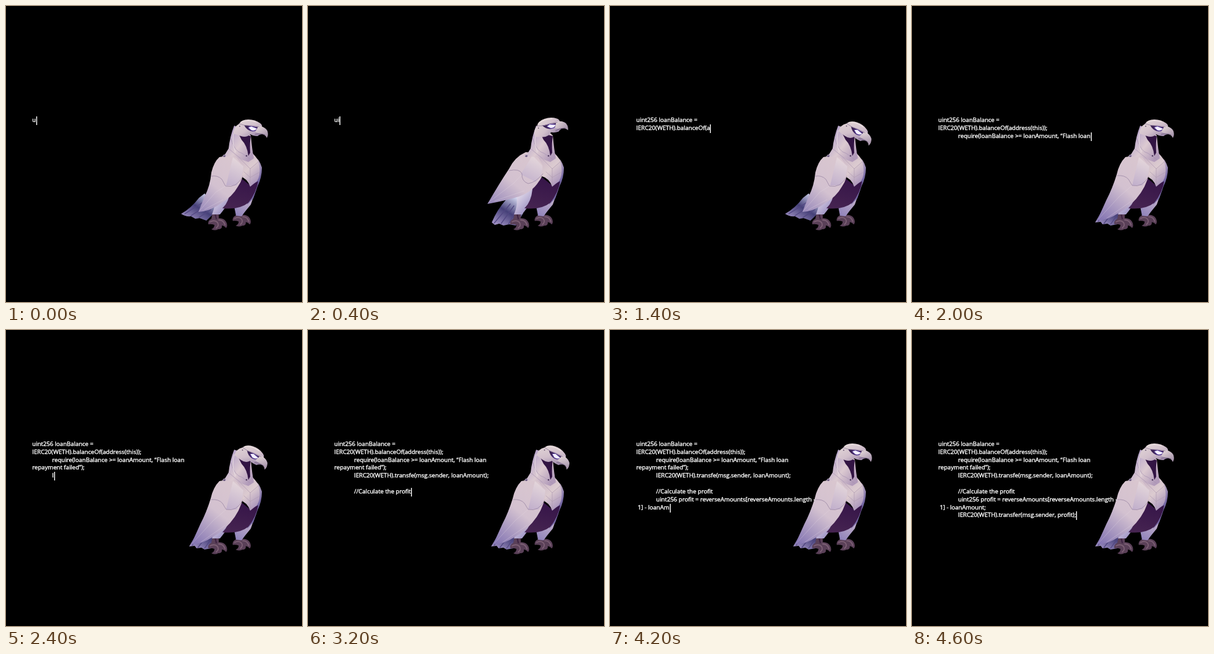
An HTML page with a canvas that plays this animation: 480 px wide and 480 px high, repeating every 4800 ms.

```html
<!DOCTYPE html>
<html lang="en">
<head>
<meta charset="utf-8">
<title>Typing bird</title>
<style>
html, body { margin: 0; width: 100%; height: 100%; overflow: hidden; background: #000; }
canvas { display: block; width: 480px; height: 480px; }
</style>
</head>
<body>
<canvas id="stage" width="480" height="480"></canvas>
<script>
const ctx = document.getElementById('stage').getContext('2d');
const STEP = 200, COUNT = 24;

// ---- typed text ----
const LEFT = 42.6, INDENT = 74.8;
const lines = [
  [LEFT, 'uint256 loanBalance ='],
  [LEFT, 'IERC20(WETH).balanceOf(address(this));'],
  [INDENT, 'require(loanBalance >= loanAmount, “Flash loan'],
  [LEFT, 'repayment failed”);'],
  [INDENT, 'IERC20(WETH).transfe(msg.sender, loanAmount);'],
  [LEFT, ''],
  [INDENT, '//Calculate the profit'],
  [INDENT, 'uint256 profit = reverseAmounts[reverseAmounts.length -'],
  [LEFT, ' 1] - loanAmount;'],
  [INDENT, 'IERC20(WETH).transfer(msg.sender, profit);']
];
// line being typed and characters shown on it, per step
const typed = [
  [0, 1], [0, 2], [0, 2], [0, 19], [0, 21], [1, 8], [1, 10], [1, 24],
  [2, 0], [2, 1], [2, 46], [3, 13], [4, 1], [4, 28], [5, 0], [6, 2],
  [6, 22], [7, 1], [7, 2], [7, 3], [7, 30], [8, 12], [9, 1], [9, 42]
];

function drawText(step) {
  const [row, chars] = typed[step];
  ctx.font = '9.6px "Open Sans", "Noto Sans", sans-serif';
  ctx.textBaseline = 'alphabetic';
  ctx.fillStyle = ctx.strokeStyle = '#fff';
  ctx.lineWidth = 0.4;
  for (let i = 0; i <= row; i++) {
    const [x, text] = lines[i];
    const y = Math.round(188 + i * 12.83);
    const part = i < row ? text : text.slice(0, chars);
    ctx.fillText(part, x, y);
    ctx.strokeText(part, x, y);
    if (i === row) {
      const end = chars ? x + ctx.measureText(part).width + 0.3 : LEFT;
      ctx.fillRect(Math.round(end), y - 9, 1.4, 14);
    }
  }
}

// ---- bird ----
function shade(x0, y0, x1, y1, ...colors) {
  const g = ctx.createLinearGradient(x0, y0, x1, y1);
  colors.forEach((c, i) => g.addColorStop(i / (colors.length - 1), c));
  return g;
}
function fill(d, color) {
  ctx.fillStyle = color;
  ctx.fill(new Path2D(d));
}
function line(d, color = '#94809f', width = 0.7) {
  ctx.strokeStyle = color;
  ctx.lineWidth = width;
  ctx.stroke(new Path2D(d));
}
function dot(x, y, r, color) {
  ctx.beginPath();
  ctx.arc(x, y, r, 0, Math.PI * 2);
  ctx.fillStyle = color;
  ctx.fill();
}

const wings = {
  out: {
    tail: 'M322 304L313 311Q300 328 284 337Q291 342 300 341L307 345L314 344L325 348L344 330Z',
    ribs: 'M290 337L320 318M300 340L326 323M313 343L332 330',
    wing: 'M346 245Q337 253 333 270Q331 292 322 309L312 334Q331 333 350 319Q367 309 376 293Q386 279 385 262L371 241Z',
    fold: 'M333 276Q343 274 350 281L356 292Q374 296 384 276',
    facet: 'M368 245L385 260Q383 278 374 291L357 291Z',
    feather: 'M313 333L340 302L356 292M322 330L352 314'
  },
  raised: {
    tail: 'M342 306L322 313Q306 331 298 351L303 355L310 353L317 356L326 354L337 356L349 336L349 308Z',
    ribs: 'M302 352L328 321M313 353L334 324M325 354L339 328',
    wing: 'M353 237Q335 245 326 264Q310 288 291 321Q319 316 342 309Q364 301 374 285Q384 273 380 257L369 238Z',
    fold: 'M326 267Q343 263 347 272Q346 284 357 288Q370 286 381 272',
    facet: 'M364 242L380 259Q381 273 369 285L345 273Z',
    feather: 'M292 319L334 287L347 273M303 316L350 300'
  },
  tucked: {
    tail: 'M320 309Q310 330 297 351L306 350L309 354L317 353L322 356L333 354L346 329Z',
    ribs: 'M302 349L325 325M311 353L329 330M322 354L336 334',
    wing: 'M346 245Q336 255 332 273Q325 296 315 315Q306 335 300 348Q318 347 333 337Q356 325 371 303Q385 282 385 262L371 241Z',
    fold: 'M333 275Q345 274 351 281L357 291Q374 295 384 276',
    facet: 'M368 245L385 260Q383 278 374 291L357 291Z',
    feather: 'M303 345L336 309L357 291M316 344L355 317'
  }
};

function drawFoot(x, y, s) {
  ctx.save();
  ctx.translate(x, y);
  ctx.scale(s, s);
  fill('M-10 -18L0 -18L0 -9Q9 -9 12 -3Q15 3 12 7Q8 3 5 3Q6 9 -1 9Q-6 12 -12 9Q-7 7 -7 2Q-12 0 -17 1Q-18 -5 -12 -8Z', '#5a4058');
  line('M-14 -3Q-7 -7 -2 -2Q1 3 -4 7M0 -6Q8 -6 10 2', '#7d6075', 1.8);
  line('M-6 -16L-4 -8', '#3d2242', 2);
  ctx.restore();
}

function drawBody(w) {
  fill(w.tail, shade(334, 307, 304, 355, '#d9dcf3', '#454078', '#a394c6'));
  line(w.ribs, '#514681', 1.3);

  // legs and feet
  drawFoot(345, 353, 1);
  drawFoot(384, 347.5, 0.96);
  fill('M338 304L370 285L366 310Q357 326 347 338L334 338Q341 322 338 304Z', shade(337, 312, 360, 334, '#ded6e8', '#9387bd'));
  fill('M370 325L406 297Q401 310 397 322L388 333L382 341L373 340Z', shade(398, 306, 374, 339, '#c9b7cc', '#9184bb'));

  // far wing, belly and breast plate
  fill('M399 240Q411 248 415 262Q415 278 408 292L401 312L391 322L397 286Z', shade(399, 262, 415, 275, '#c3b0c6', '#7568a4'));
  fill('M370 270L396 291L409 284Q406 303 393 319Q378 331 351 328Q362 318 364 297Z', shade(380, 275, 367, 330, '#351448', '#462451'));
  fill('M366 240L400 239Q409 247 411 260Q413 275 407 284L396 293Q391 279 379 276Z', shade(375, 246, 411, 284, '#cbb6c7', '#dccbd0', '#a893bb'));
  line('M379 247L396 264L410 252M396 264L396 291M386 269L396 278L410 270', '#b19bb2');

  // near wing
  fill(w.wing, shade(383, 249, 306, 344, '#dac7cf', '#d3c1d0', '#8778b4'));
  fill(w.facet, shade(378, 248, 357, 291, '#e5d7db', '#c0aecb'));
  line(w.feather, 'rgba(232,220,233,.3)', 1);
  line(w.fold);
}

function drawNeck() {
  fill('M370 194Q363 212 361 231L353 244L371 245L393 253L402 247Q399 233 397 210L386 200Z', shade(360, 210, 400, 239, '#b9a6ca', '#dccad1', '#b29bba'));
  fill('M376 205L397 211Q395 222 396 238L393 243Q391 226 382 217Z', '#321443');
  line('M365 215Q370 236 383 239L397 249M362 232Q371 240 380 247', '#a793b2');
  line('M370 202Q365 220 372 237', '#e9dde3', 1);
  dot(354, 243, 2, '#6d5c83');
  line('M351 244Q354 239 358 243', '#c9bbd2', 1);
  dot(390, 243, 1.3, '#513c61');
}

// turn in degrees, then shift
const heads = { A: [0, 0, 0], B: [-22, -3, -0.5], b: [-19, -2.5, -0.5], C: [18, 1, 2] };

function drawHead([turn, dx, dy]) {
  ctx.save();
  ctx.translate(388 + dx, 205 + dy);
  ctx.rotate(turn * Math.PI / 180);
  ctx.translate(-388, -205);
  fill('M369 207Q369 196 378 191Q382 184 393 184Q404 184 412 190Q416 193 415 196Q422 198 424 203L423 208Q412 207 408 211Q401 211 396 208Q390 214 381 211Z', shade(383, 187, 400, 215, '#ded0d4', '#d2c0cc', '#a18dae'));
  fill('M386 193L400 195L411 197Q407 204 398 203Q390 201 386 193Z', '#392052');
  ctx.shadowColor = '#775cff';
  ctx.shadowBlur = 3;
  fill('M393 197L398 195.5L407 199Q404 203 398 201.5Z', '#f4f0ff');
  ctx.shadowBlur = 0;
  fill('M410 194Q420 196 424 203Q426 209 423 214Q420 207 411 207L404 204Z', shade(410, 196, 419, 211, '#ded1d4', '#ab99af'));
  line('M404 208Q413 206 420 209', '#705d7d', 0.9);
  line('M378 191Q388 195 398 194L411 196', '#9a87a2', 0.9);
  line('M381 188Q393 183.5 405 188', '#f0e6e3', 1);
  dot(379, 195, 0.9, '#65536e');
  ctx.restore();
}

const headOrder = 'ABbbBbBCCAAACAAACCCABAAA';

function wingAt(step) {
  if (step === 0 || step === 7) return wings.out;
  return step < 7 ? wings.raised : wings.tucked;
}

function draw(step) {
  ctx.fillStyle = '#000';
  ctx.fillRect(0, 0, 480, 480);
  ctx.lineJoin = ctx.lineCap = 'round';
  drawBody(wingAt(step));
  drawNeck();
  drawHead(heads[headOrder[step]]);
  drawText(step);
}

const start = performance.now();
function tick() {
  const t = performance.now() - start;
  draw(Math.floor(t / STEP) % COUNT);
  requestAnimationFrame(tick);
}
tick();
</script>
</body>
</html>
```
